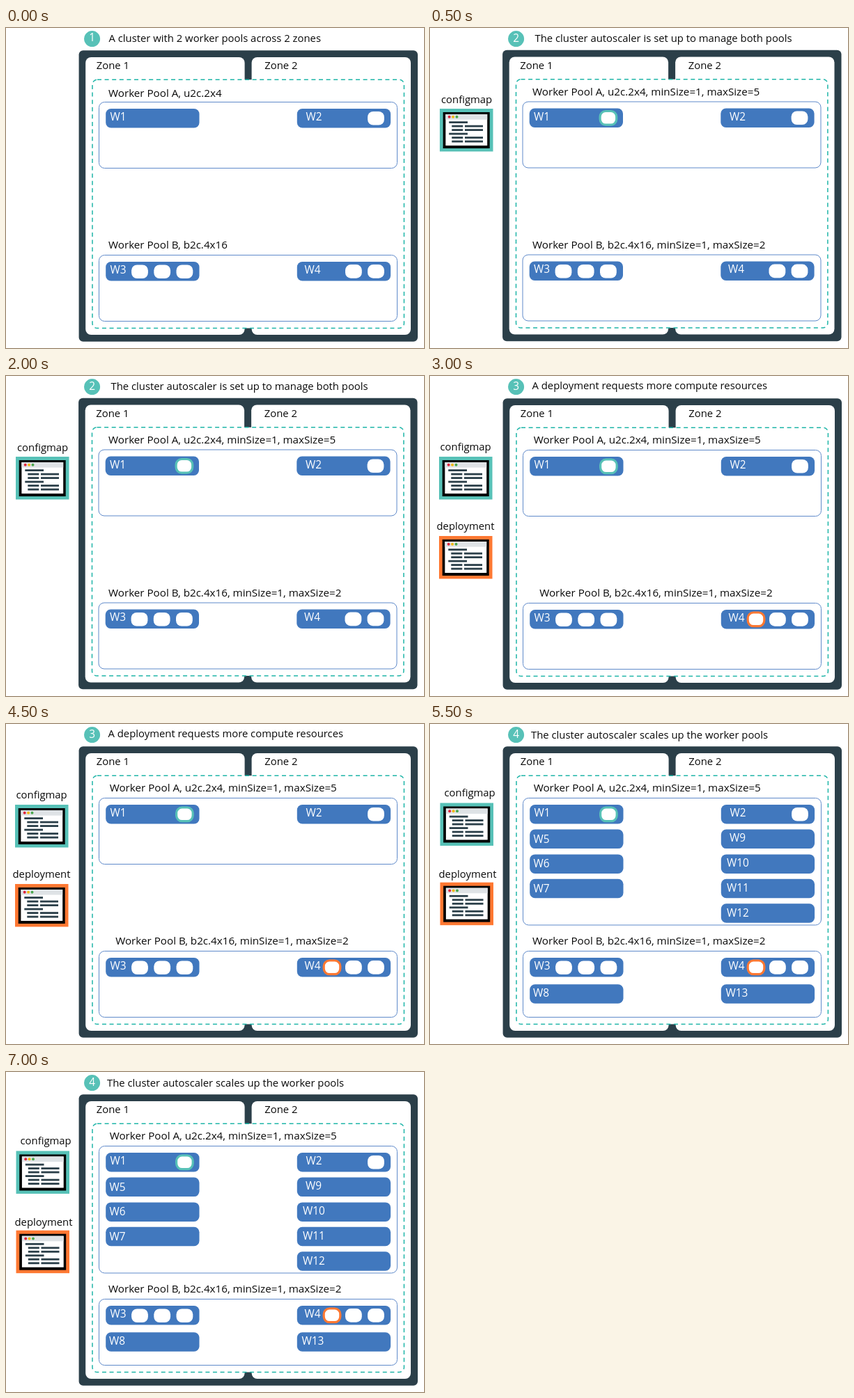
These frames come from a looping animation (600x460 px, 8 s). An HTML page:

```html
<!DOCTYPE html>
<html lang="en">
<head>
<meta charset="utf-8">
<title>Cluster autoscaler</title>
<style>
  html, body { margin: 0; width: 100%; height: 100%; overflow: hidden; background: #fff; }
  svg { display: block; width: 600px; height: 460px; }
  text { font-family: "Open Sans", "Noto Sans", sans-serif; font-size: 14.85px; fill: #0a0a0a; }
  text.pool { font-size: 15.2px; }
  text.light { font-size: 15.4px; fill: #fff; }
</style>
</head>
<body>
<svg id="stage" viewBox="0 0 600 460"></svg>
<script>
const LOOP = 8000;
const TEAL = '#57c1b7', ORANGE = '#ff7832', BLUE = '#4178be', DARK = '#2b3f49';

const rect = (x, y, w, h, fill, r = 0, extra = '') =>
  `<rect x="${x}" y="${y}" width="${w}" height="${h}" rx="${r}" fill="${fill}" ${extra}/>`;
const text = (x, y, s, cls = '') => `<text x="${x}" y="${y}" class="${cls}">${s}</text>`;
const dot = (x, y, r, fill) => `<circle cx="${x}" cy="${y}" r="${r}" fill="${fill}"/>`;

const badge = (n, y = 20) => dot(123.6, 15.6, 11.5, TEAL) +
  `<text x="123.6" y="${y}" class="light" text-anchor="middle">${n}</text>`;

const worker = (x, y, label, tx, ty) =>
  rect(x, y, 134.3, 27.5, BLUE, 7.5) + text(tx, ty, label, 'light');
const pod = (cx, cy) => rect(cx - 11.9, cy - 9.8, 23.8, 19.6, '#fff', 8);
const newPod = (cx, cy, color) =>
  rect(cx - 11.8, cy - 9.8, 23.6, 19.6, '#fff', 8, `stroke="${color}" stroke-width="3.2"`);

const poolBox = (y, h) => rect(133.5, y, 428, h, '#fff', 8, 'stroke="#5f8aca"');

// Window with lines of code inside a coloured border
function file(x, y, color) {
  let s = rect(0, 0, 76.5, 61.5, color) + rect(4.7, 5, 67, 52, '#000') +
    rect(8.4, 8, 59.8, 45, '#fff') + rect(8.4, 8, 59.8, 7.6, '#dfe3e6');
  ['#e0263c', '#f2b807', '#4aa84e'].forEach((c, i) => s += dot(13.7 + i * 5.4, 11.7, 2, c));
  for (let i = 0; i < 6; i++) {
    const ly = 18.2 + i * 5.5;
    s += i % 3 ? rect(17.3, ly, 16, 2.8, DARK) + rect(36, ly, 26, 2.8, DARK)
               : rect(13.3, ly, 26.7, 2.8, DARK);
  }
  return `<g transform="translate(${x} ${y})">${s}</g>`;
}

function cluster(scaled) {
  let s = rect(104.6, 32.2, 486.4, 418.6, DARK, 6) +
    rect(114.2, 42, 228.4, 399, '#fff', 8) + rect(352.6, 42, 228.4, 399, '#fff', 8) +
    rect(124, 74.2, 447.4, 357.3, '#fff', 7,
      'stroke="#1fb5a8" stroke-width="1.5" stroke-dasharray="6 4.6"') +
    text(129.7, 59, 'Zone 1') + text(371.2, 59, 'Zone 2') +
    poolBox(106.5, scaled ? 182.5 : 95) + poolBox(326.5, 95) +
    worker(143.2, 116, 'W1', 149.5, 133) + worker(417.8, 116, 'W2', 430.5, 133) +
    worker(143.2, 336, 'W3', 149.5, 352.7) + worker(417.8, 336, 'W4', 428.5, 352.7);
  for (const x of [192, 224.2, 256.4]) s += pod(x, 350.2);
  for (const x of [498.9, 531]) s += pod(x, 349.9);
  return s + pod(531, 129.8);
}

function addedWorkers() {
  const rows = [151.6, 187.4, 222.7, 258.2];
  return ['W5', 'W6', 'W7'].map((n, i) => worker(143.2, rows[i], n, 148.5, 170.5 + i * 35.6)).join('') +
    ['W9', 'W10', 'W11', 'W12'].map((n, i) =>
      worker(417.8, rows[i], n, i ? 426 : 430, 168.5 + i * 36.1)).join('') +
    worker(143.2, 374.2, 'W8', 148, 391.5) + worker(417.8, 374.2, 'W13', 424.5, 392);
}

const limits = max => `, minSize=1, maxSize=${max}`;
const poolA = (x, y, tail = '') => text(x, y, 'Worker Pool A, u2c.2x4' + tail, 'pool');
const poolB = (x, tail = '') => text(x, 317, 'Worker Pool B, b2c.4x16' + tail, 'pool');
const configPod = newPod(256.4, 129.8, TEAL);
const deployPod = newPod(468, 349.8, ORANGE);

const scenes = [
  { at: 0, art: badge(1, 18.8) + text(147.5, 20, 'A cluster with 2 worker pools across 2 zones') +
      cluster() + poolA(147, 99) + poolB(147) },
  { at: 500, art: badge(2) + text(150.5, 20, 'The cluster autoscaler is set up to manage both pools') +
      `<g transform="translate(-.5 -.5)">${cluster() + configPod}</g>` +
      poolA(147, 97, limits(5)) + poolB(147, limits(2)) +
      text(16, 108, 'configmap') + file(14, 116, TEAL) },
  { at: 3000, art: badge(3) + text(146.5, 19, 'A deployment requests more compute resources') +
      cluster() + configPod + deployPod +
      poolA(148.7, 97, limits(5)) + poolB(157.2, limits(2)) +
      text(14.5, 107, 'configmap') + file(13, 116, TEAL) +
      text(9.5, 220.5, 'deployment') + file(13, 230, ORANGE) },
  { at: 5500, art: badge(4) + text(145, 21, 'The cluster autoscaler scales up the worker pools') +
      cluster(true) + addedWorkers() + configPod + deployPod +
      poolA(148.7, 97, limits(5)) + poolB(147, limits(2)) +
      text(20.5, 104, 'configmap') + file(14.5, 113.5, TEAL) +
      text(12.5, 220.5, 'deployment') + file(14.5, 227.7, ORANGE) }
];

const stage = document.getElementById('stage');
stage.innerHTML = scenes.map(s => `<g visibility="hidden">${s.art}</g>`).join('');
const layers = [...stage.children];

function draw() {
  const t = performance.now() % LOOP;
  const current = scenes.filter(s => s.at <= t).length - 1;
  layers.forEach((g, i) => g.setAttribute('visibility', i === current ? 'visible' : 'hidden'));
  requestAnimationFrame(draw);
}
draw();
</script>
</body>
</html>
```
